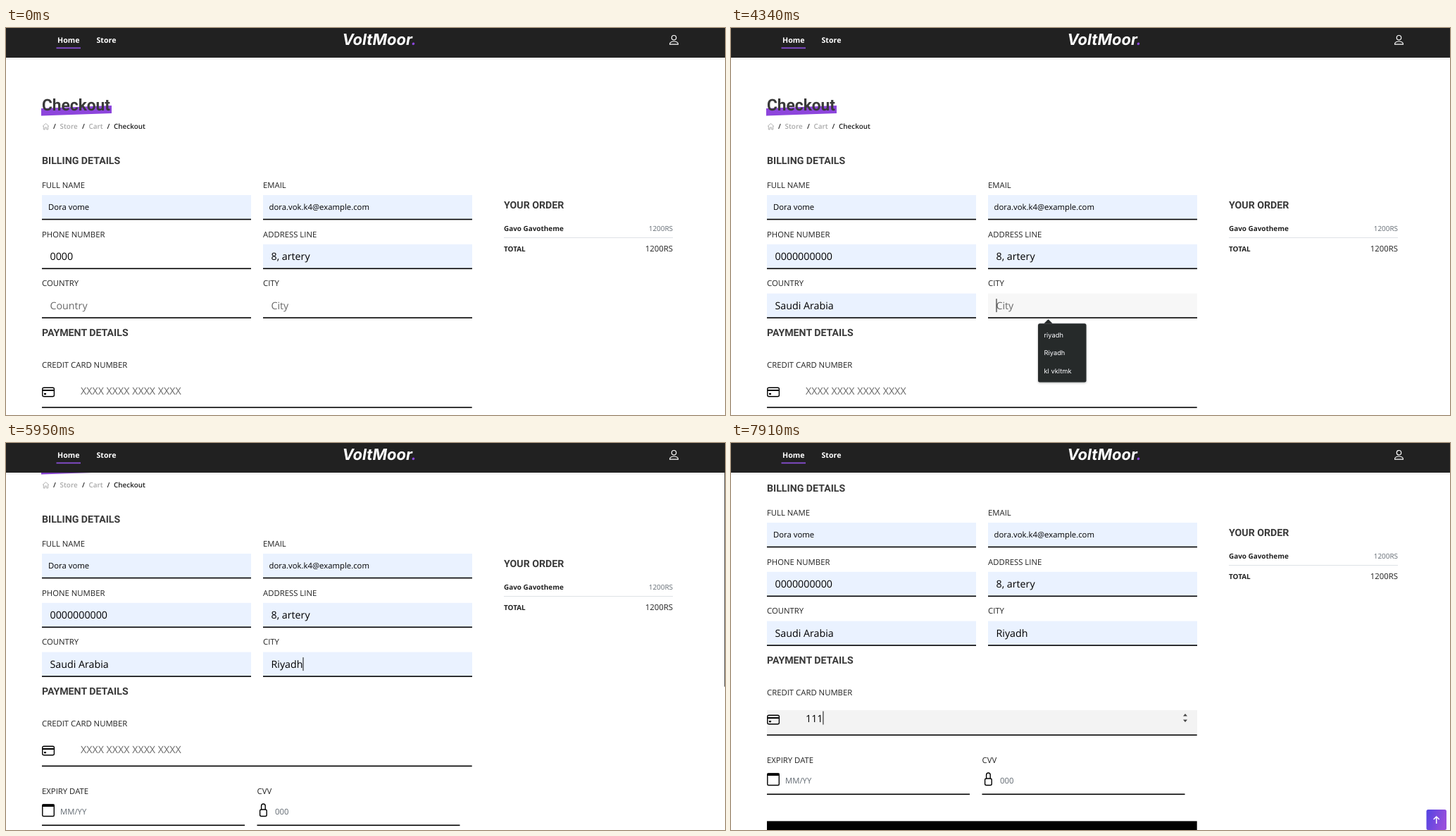
Animation, 1021 px wide and 549 px high, one loop 8000 ms. Source, as an HTML page:

```html
<!DOCTYPE html>
<html lang="en">
<head>
<meta charset="utf-8">
<title>Checkout</title>
<style>
  html, body { margin: 0; width: 100%; height: 100%; overflow: hidden; background: #fff; }
  svg { display: block; width: 100vw; height: 100vh; }
  text { font-family: "Open Sans", sans-serif; font-size: 11.34px; fill: #212121; text-rendering: geometricPrecision; }
  .head { font: 600 14.18px Roboto, sans-serif; fill: #3a3a3a; }
  .title { font: 600 22.7px Roboto, sans-serif; fill: #3a3a3a; }
  .small { font-size: 9.93px; }
  .semi { font-weight: 600; }
  .bold { font-weight: 700; }
  .end { text-anchor: end; }
  .muted { fill: #626a72; }
  .faint { fill: #aaa; }
  .nav { font-size: 10.64px; font-weight: 700; fill: #fff; }
  .logo { font: italic 700 22px Inter, sans-serif; fill: #fff; }
  .value { font-size: 14.25px; fill: #000; }
  .auto { fill: #000; }
  .hint { font-size: 14.25px; fill: #6a6a6a; }
  .preview { font: 9.45px "Liberation Sans", Arial, sans-serif; fill: #000; }
  .option { font: 9.3px Inter, sans-serif; fill: #fff; }
  .line { fill: none; stroke: #000; stroke-width: 1.4; stroke-linejoin: round; }
</style>
</head>
<body>
<svg viewBox="0 0 1021 549" preserveAspectRatio="none">
  <defs>
    <linearGradient id="violet" x2="1" y2=".3">
      <stop stop-color="#5344e2"/><stop offset="1" stop-color="#964fdc"/>
    </linearGradient>
    <filter id="shade" x="-20%" y="-20%" width="140%" height="150%">
      <feDropShadow dx="0" dy="1" stdDeviation="1.5" flood-opacity=".3"/>
    </filter>
  </defs>
  <g id="page"><g id="fixed"></g><g id="form"></g></g>
  <g id="header">
    <path d="M0 42H1021V43H0z" fill="#000" opacity=".13"/>
    <path d="M0 43H1021V45H0z" fill="#000" opacity=".04"/>
    <path d="M0 0H1021V42H0z" fill="#212121"/>
    <text class="nav" x="73" y="21">Home</text>
    <text class="nav" x="128.5" y="21">Store</text>
    <path d="M71.500 27.600H106V29.200H71.500z" fill="#8a4fd8"/>
    <text class="logo" x="477.500" y="24">VoltMoor<tspan fill="#8a45dc">.</tspan></text>
    <g fill="none" stroke="#fff" stroke-width="1.2">
      <circle cx="948.5" cy="13.700" r="3.200"/>
      <path d="M942.500 23.200C942.500 17.600 954.500 17.600 954.500 23.200z" stroke-linejoin="round"/>
    </g>
  </g>
  <g id="overlay"></g>
</svg>
<script>
const LOOP = 8000, STEP = 70;
const $ = id => document.getElementById(id);
const clamp = v => Math.max(0, Math.min(1, v));
const text = (x, y, cls, str) => `<text x="${x}" y="${y}" class="${cls}">${str}</text>`;
const rect = (x, y, w, h, fill, extra = '') =>
  `<rect x="${x}" y="${y}" width="${w}" height="${h}" fill="${fill}" ${extra}/>`;
const path = (d, attrs) => `<path d="${d}" ${attrs}/>`;
const rule = (x, y, w) => rect(x, y, w, 1.6, '#000');

const measurer = document.createElement('canvas').getContext('2d');
function caret(x, baseline, str) {
  measurer.font = '14.25px "Open Sans", sans-serif';
  return rect(x + measurer.measureText(str).width, baseline - 15, 1, 19, '#111');
}
const blinkOn = (t, since) => Math.floor((t - since) / 500) % 2 === 0;

const LEFT = 51, RIGHT = 365, FIELD_W = 297, BLUE = '#eaf2ff';

// Timed fields: focus, suggestion list, hovered rows [time, index], choice.
const fields = [
  { x: LEFT, y: 306.8, typed: '0000', focus: 1190, open: 1330, commit: 2520, blur: 3080,
    options: ['0000000000'], hover: [[2030, 0]], listW: 86 },
  { x: LEFT, y: 376.6, hint: 'Country', focus: 3080, open: 3150, commit: 3850, blur: 4270,
    options: ['USA', 'Saudi Arabia'], hover: [[3430, 0], [3570, 1]], listW: 86 },
  { x: RIGHT, y: 376.6, hint: 'City', focus: 4270, open: 4340, commit: 5600, blur: 6790,
    options: ['riyadh', 'Riyadh', 'kl vkltmk'], hover: [[4970, 0], [5180, 1]], listW: 68.5 },
];
const card = { hover: 6440, focus: 6790, keys: [7420, 7630, 7910] };
const scrollKeys = [[5600, 0], [5740, 8], [5880, 51.4], [5950, 80], [6020, 103],
                    [6090, 115.6], [6160, 120.5], [6300, 124]];

function scrollAt(t) {
  const i = scrollKeys.findIndex(k => k[0] > t);
  if (i === 0) return 0;
  if (i < 0) return scrollKeys.at(-1)[1];
  const [t0, a] = scrollKeys[i - 1], [t1, b] = scrollKeys[i];
  return a + (b - a) * (t - t0) / (t1 - t0);
}

function drawFixed() {
  const labels = [
    [LEFT, 226.5, 'FULL NAME'], [RIGHT, 226.5, 'EMAIL'],
    [LEFT, 296.5, 'PHONE NUMBER'], [RIGHT, 296.5, 'ADDRESS LINE'],
    [LEFT, 366.3, 'COUNTRY'], [RIGHT, 366.3, 'CITY'],
    [LEFT, 482, 'CREDIT CARD NUMBER'], [LEFT, 577.5, 'EXPIRY DATE'], [356.5, 577.5, 'CVV'],
  ];
  const filled = [
    [LEFT, 237, 'Dora vome', 'auto', 9, 258], [RIGHT, 237, 'dora.vok.k4@example.com', 'auto', 8.5, 258],
    [RIGHT, 306.8, '8, artery', 'value', 11.5, 329.3],
  ];
  $('fixed').innerHTML =
    path('M50 114L150 110V121L50 124.500z', 'fill="#8d45dc"') +
    text(51, 117.3, 'title', 'Checkout') +
    path('M52 139.500L56.500 135.500L61 139.500M53.300 139V144H55.300V141H57.700V144H59.700V139',
      'fill="none" stroke="#aaa" stroke-width=".9"') +
    [[67, '', '/'], [76.5, 'faint', 'Store'], [108, '', '/'], [117.5, 'faint', 'Cart'],
     [143.5, '', '/'], [153, '', 'Checkout']]
      .map(([x, cls, s]) => text(x, 143.3, 'small semi ' + cls, s)).join('') +
    text(LEFT, 193, 'head', 'BILLING DETAILS') +
    text(LEFT, 437, 'head', 'PAYMENT DETAILS') +
    labels.map(([x, y, s]) => text(x, y, '', s)).join('') +
    filled.map(([x, y, s, cls, dx, base]) =>
      rect(x, y, FIELD_W, 35, BLUE) + rule(x, y + 33.7, FIELD_W) + text(x + dx, base, cls, s)).join('') +
    text(707, 256, 'head', 'YOUR ORDER') +
    text(707, 288, 'small bold', 'Gavo Gavotheme') +
    text(947, 288, 'small muted end', '1200RS') +
    rect(707, 297, 240, 1, '#dee2e6') +
    text(707, 316.6, 'small bold', 'TOTAL') +
    text(947, 316.6, 'end', '1200RS') +
    // Expiry date and CVV
    rule(LEFT, 621.5, 288) + rule(356.5, 621.5, 288) +
    rect(51.8, 593, 16.5, 16.5, 'none', 'rx="1.5" class="line"') +
    path('M51.500 592.500H68.500V596H51.500z', '') +
    text(77, 606.5, 'muted', 'MM/YY') +
    rect(360.6, 600, 9.6, 9.5, 'none', 'rx="2" class="line"') +
    path('M362.600 600V595A2.800 3 0 0 1 368.200 595V600', 'class="line"') +
    text(382, 606.5, 'muted', '000') +
    rect(LEFT, 660.4, 610.7, 36, '#000');
}

function drawField(f, t) {
  const base = f.y + 22.5, x = f.x + 11.5;
  const row = f.hover.filter(h => h[0] <= t).at(-1);
  const done = t >= f.commit, focused = t >= f.focus && t < f.blur;
  const fill = row ? BLUE : '#f3f3f3';
  const shade = row ? 1 : clamp((t - f.focus + STEP) / 210);
  let out = rect(f.x, f.y, FIELD_W, 35, fill, `opacity="${shade}"`) + rule(f.x, f.y + 33.7, FIELD_W);
  if (row && !done) return out + text(x, base + .2, 'preview', f.options[row[1]]);
  const value = done ? f.options[row[1]] : f.typed || '';
  out += value ? text(x, base, 'value', value) : text(x, base, 'hint', f.hint);
  if (focused && blinkOn(t, done ? f.commit : f.focus)) out += caret(x, base, value);
  return out;
}

function drawList(f, t) {
  const alpha = 1 - clamp((t - f.commit + STEP) / 210);
  if (t < f.open || alpha <= 0) return '';
  const x = f.x + 71, y = f.y + 42.7, rowH = 25.7;
  const row = f.hover.filter(h => h[0] <= t).at(-1);
  return `<g opacity="${alpha}" filter="url(#shade)">` +
    path(`M${x + 8.5} ${y}l6 -6l6 6z`, 'fill="#25292c"') +
    rect(x, y, f.listW, 6 + rowH * f.options.length, '#25292c', 'rx="2.500"') +
    (row ? rect(x, y + 3 + rowH * row[1], f.listW, rowH, '#424344') : '') +
    f.options.map((s, i) => text(x + 8.5, y + 19.2 + rowH * i, 'option', s)).join('') + '</g>';
}

function drawCard(t) {
  const base = 519.5, x = 106;
  const digits = '1'.repeat(card.keys.filter(k => k <= t).length);
  let out = rect(LEFT, 503, 611, 35.5, '#f3f3f3', `opacity="${clamp((t - card.focus + STEP) / 210)}"`) +
    rule(LEFT, 537.5, 610.7) +
    rect(51.8, 510.3, 16.6, 12.5, 'none', 'rx="2" class="line"') +
    path('M52 513H68.500V515H52zM54 518H57V520.300H54z', '') +
    (digits ? text(x, base, 'value', digits) : text(x, base, 'hint', 'XXXX XXXX XXXX XXXX'));
  if (t >= card.hover) out += path('M642 511.500l3 -3.500l3 3.500zM642 516.500l3 3.500l3 -3.500z', 'fill="#444"');
  const since = digits ? card.keys[digits.length - 1] : card.focus;
  if (t >= card.focus && blinkOn(t, since)) out += caret(x, base, digits);
  return out;
}

function drawOverlay(t, scroll) {
  const bar = t < 5670 ? 0 : 1 - clamp((t - 6720) / 210);
  const button = clamp((t - 5950) / 200);
  const top = Math.max(42, scroll * .546 - 5), bottom = 302 + scroll * .546;
  return rect(1020, top, 1, bottom - top, '#5a5a5a', `opacity="${bar}"`) +
    `<g opacity="${button}">` + rect(987.5, 520, 28.5, 29, 'url(#violet)', 'rx="2.500"') +
    path('M1001.700 540V530M997.700 534L1001.700 530L1005.700 534',
      'fill="none" stroke="#fff" stroke-width="1.5"') + '</g>';
}

function render(now) {
  const t = Math.floor((now % LOOP) / STEP) * STEP;
  const scroll = scrollAt(t);
  $('page').setAttribute('transform', `translate(0 ${-scroll})`);
  $('form').innerHTML = fields.map(f => drawField(f, t)).join('') + drawCard(t) +
    fields.map(f => drawList(f, t)).join('');
  $('overlay').innerHTML = drawOverlay(t, scroll);
}

drawFixed();
const start = performance.now();
function tick() {
  render(performance.now() - start);
  requestAnimationFrame(tick);
}
tick();
</script>
</body>
</html>
```
